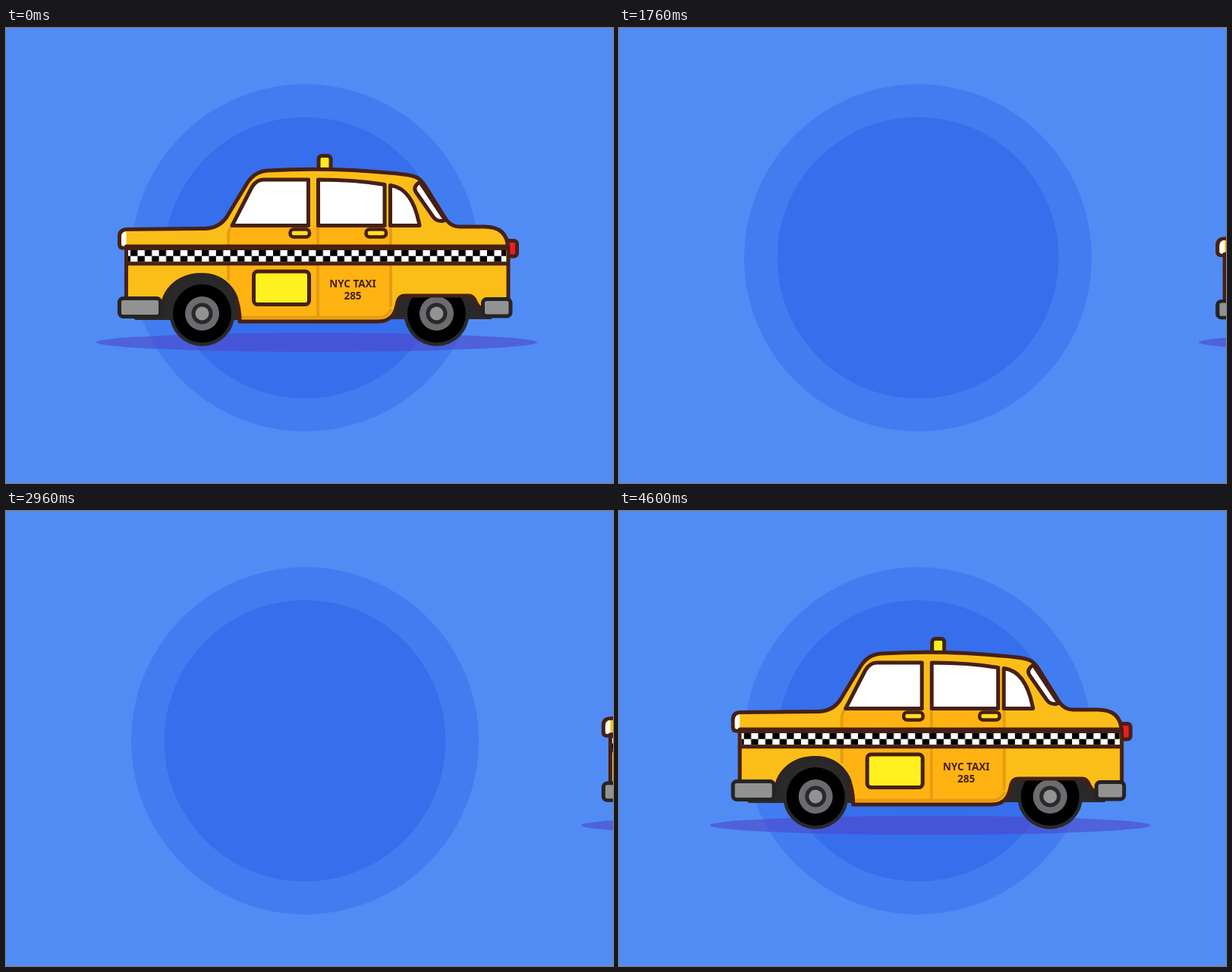
Recreate the animation shown at these times as an HTML page. Size 800 by 600 pixels, loop 4640 ms.

```html
<!DOCTYPE html>
<html lang="en">
<head>
<meta charset="utf-8">
<title>Taxi</title>
<style>
  html, body { margin: 0; width: 100%; height: 100%; overflow: hidden; background: #508cf4; }
  svg { display: block; width: 100%; height: 100%; }
  .line { stroke: #462015; stroke-width: 5; stroke-linejoin: round; stroke-linecap: round; }
  .seam { fill: none; stroke: #e79b14; stroke-width: 4; }
  .bumper { fill: #929292; stroke: #272324; stroke-width: 5; }
  .dark { fill: #2a2929; }
  text { font: 600 13.5px "Noto Sans", "Open Sans", sans-serif; font-stretch: 75%; text-anchor: middle; fill: #462015; }
</style>
</head>
<body>
<svg viewBox="0 0 800 600">
  <defs>
    <pattern id="checks" x="164" y="293" width="18.8" height="15.4" patternUnits="userSpaceOnUse">
      <path fill="#fff" d="M0 0H18.8V15.4H0Z"/>
      <path d="M0 0H9.4V7.7H0ZM9.4 7.7H18.8V15.4H9.4Z"/>
    </pattern>
    <g id="wheel">
      <circle class="dark" r="43"/>
      <circle r="38.5"/>
      <circle fill="#6c6b70" r="22.5"/>
      <circle class="dark" r="14"/>
      <circle fill="#929292" r="9"/>
    </g>
  </defs>

  <circle cx="394" cy="303" r="229" fill="#417df0"/>
  <circle cx="394" cy="303" r="185.5" fill="#366eec"/>

  <g id="car">
    <ellipse cx="409.5" cy="414.5" rx="290.5" ry="12.5" fill="#4d46ca" fill-opacity=".6"/>

    <g class="body">
      <path class="dark" d="M168 372H206C206 345 228 325 258 325C290 325 309 350 309 385H172Q168 385 168 380Z"/>
      <path class="dark" d="M500 350H620L640 372V384H500Z"/>
      <rect class="line" x="657" y="280.5" width="16.5" height="20.5" rx="4" fill="#ee1c24"/>
    </g>

    <use href="#wheel" x="258.5" y="376.5"/>
    <use href="#wheel" x="567.5" y="376.5"/>

    <g class="body">
      <rect class="line" x="412" y="168.5" width="16" height="22" rx="4" fill="#ffee1e"/>

      <!-- lower panel, then doors -->
      <path id="panel" fill="#fbbe18" d="M158.5 288V372H206C206 345 228 325.500 258 325.500C290 325.500 308 350 308 387H490C512 387 514 370 516 361Q518 353 526 353H610Q616 353 619 361Q624 372 634 372H662V288Z"/>
      <path class="line" fill="#fbbe18" d="M158 290H154Q149.500 290 149.500 285V275Q149.500 265.500 160 265.500L262 264.500Q281 264 291 249L317 206Q327 189 345 188Q430 183 520 192.500C546 195 547 200 556 214L579 251Q586 262 598 262H630Q661 262 661.500 290Z"/>
      <path fill="#fff" d="M158.500 268V287.500H155Q152 287.500 152 284V276Q152 269 158.500 268Z"/>
      <path fill="#feb313" d="M293 288V275Q293 264 300 260H507V370Q503 384.500 490 384.500H308C307 350 301 342 293 335Z"/>
      <path class="seam" d="M293 333V275Q293 266 297 262M411 262V382M507 262V368M309 381.500H493Q503 381 508 370"/>
      <use href="#panel" class="line" style="fill-opacity:0"/>
      <path fill="none" stroke="#2a2625" stroke-width="5" d="M207 374C207 345 229 326 258 326C282 326 298 340 304 358"/>

      <!-- checkered band -->
      <path fill="url(#checks)" d="M161 293H659V308.400H161Z"/>
      <path class="line" fill="none" d="M158.500 290.500H661.500M158.500 310.700H661.500"/>

      <!-- windows -->
      <g class="line" fill="#fff">
        <path d="M298 260.500L324 210Q330 200 339 200H398.500V260.500Z"/>
        <path d="M411.500 200Q460 200 499 206.500V260.500H411.500Z"/>
        <path d="M506.500 207.500Q536 211 545 260.500H506.500Z"/>
        <path d="M545.500 203L579 253.500Q569 257 563 249L540 216Q536 209 545.500 203Z"/>
      </g>

      <g class="line" fill="#ffdf20" style="stroke-width:4.500">
        <rect x="374.500" y="265.500" width="25.500" height="10" rx="4.500"/>
        <rect x="474.500" y="265.500" width="26.500" height="10" rx="4.500"/>
      </g>
      <rect class="line" x="326.500" y="321" width="73" height="43.500" rx="5" fill="#fff01f"/>
      <text x="457" y="342">NYC TAXI</text>
      <text x="457" y="357.500">285</text>

      <rect class="bumper" x="149.500" y="356.500" width="54" height="24" rx="5"/>
      <rect class="bumper" x="628.500" y="357.500" width="36.500" height="22.500" rx="5"/>
    </g>
  </g>
</svg>

<script>
const LOOP = 4640, STEP = 40;
const car = document.getElementById("car");
const bodies = document.querySelectorAll(".body");

// Value at time t through [time, value] keys, eased between neighbours.
function track(t, keys) {
  if (t <= keys[0][0]) return keys[0][1];
  for (let i = 1; i < keys.length; i++) {
    const [t0, a] = keys[i - 1], [t1, b] = keys[i];
    if (t < t1) return a + (b - a) * (1 - Math.cos(Math.PI * (t - t0) / (t1 - t0))) / 2;
  }
  return keys[keys.length - 1][1];
}

const settle = {
  x: [[3560, -7], [3800, 10], [4760, 0]],
  sx: [[2960, 1.01], [3440, 1], [3620, 0.99], [3800, 1.012], [4100, 1]],
  sy: [[2960, 0.94], [3440, 1.005], [3620, 1.04], [3800, 0.963], [4100, 1.007], [4400, 1]],
  tilt: [[3440, 0], [3600, -0.5], [3800, 0.6], [4080, -0.1], [4400, 0]]
};

function pose(t) {
  if (t < 1400) { // pull away
    const k = t / 960;
    return { x: -742 * k ** 4, sx: 1 + 0.06 * k ** 8, sy: 1 - 0.11 * k ** 4, tilt: 0 };
  }
  if (t < 2240) { // first pass
    const k = (t - 1760) / 280;
    return { x: 645 - 1143 * k, sx: 1.05 + 0.02 * k, sy: 0.908 - 0.023 * k, tilt: 0 };
  }
  if (t < 2800) { // second pass
    const k = (t - 2400) / 280;
    return { x: 600 - 1204 * k, sx: 1.04, sy: 0.928 - 0.02 * k, tilt: 0 };
  }
  // brake, overshoot and settle
  return {
    x: t < 3560 ? -7 + 646 * ((3560 - t) / 600) ** 3 : track(t, settle.x),
    sx: track(t, settle.sx),
    sy: track(t, settle.sy),
    tilt: track(t, settle.tilt)
  };
}

const start = performance.now();
function draw() {
  const elapsed = (performance.now() - start) % LOOP;
  const { x, sx, sy, tilt } = pose(Math.floor(elapsed / STEP) * STEP);
  car.setAttribute("transform", `translate(${x})`);
  for (const body of bodies) {
    body.setAttribute("transform",
      `translate(262 397) rotate(${tilt}) scale(${sx} ${sy}) translate(-262 -397)`);
  }
  requestAnimationFrame(draw);
}
draw();
</script>
</body>
</html>
```
